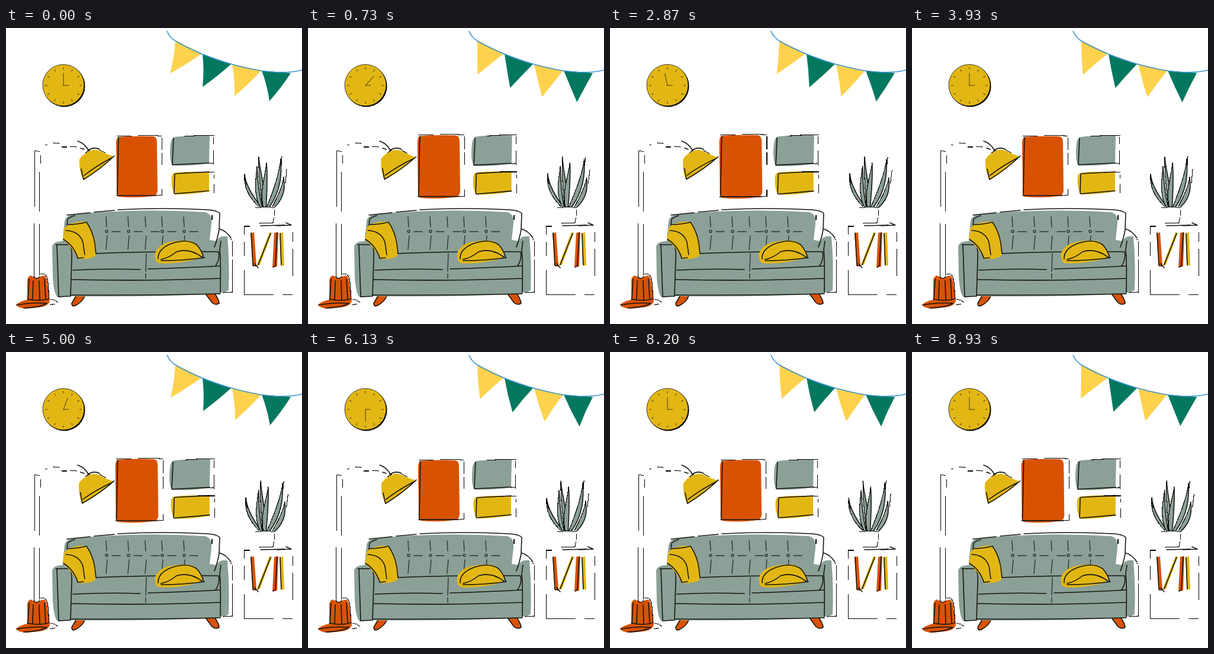
Write an HTML page that moves like this. It is 500 by 500 pixels and loops after 9.01 s.

```html
<!DOCTYPE html>
<html lang="en">
<head>
<meta charset="utf-8">
<title>Living room</title>
<style>
  html, body { margin: 0; width: 100%; height: 100%; overflow: hidden; background: #fff; }
  svg { display: block; width: 100vw; height: 100vh; }
  .ink { fill: none; stroke: #15160f; stroke-width: 1.6; stroke-linecap: round; stroke-linejoin: round; }
  .thin { fill: none; stroke: #000; stroke-width: 1.1; shape-rendering: crispEdges; }
  .soft { fill: none; stroke: #2d3630; stroke-width: 1.4; stroke-linecap: round; }
  .grey { fill: #8ba097; }
  .red { fill: #d95204; }
  .gold { fill: #e2b714; }
  .brass { fill: none; stroke: #80650f; stroke-width: 1.5; }
</style>
</head>
<body>
<svg viewBox="0 0 500 500">
  <g id="flags"></g>
  <path d="M272 5Q276 16 288 23C318 40 350 52 381 61C420 72 465 80 500 71" fill="none" stroke="#3d94d1" stroke-width="1.6"/>

  <g id="clock">
    <circle cx="98.3" cy="98" r="35.3"/>
    <circle class="gold" cx="97" cy="96.6" r="35" stroke="#15160f" stroke-width=".8"/>
    <g id="ticks"></g>
    <path class="brass" d="M96 97H106"/>
    <path class="brass" id="hand" d="M97 98V76"/>
  </g>

  <g id="poster">
    <path class="red" d="M190 184Q220 182 249 183Q255 184 255 193L256 275Q255 284 247 284Q220 288 190 285Q186 283 187 268L186 196Q186 186 190 184Z"/>
    <path class="ink" d="M190 185L188 281M187 283L255 283"/>
    <path class="thin" d="M187 182.5H212M223 181.5H250L263 182.5M263.5 185V206M263.5 211V231M263.5 272V282.5H256"/>
  </g>
  <g id="print">
    <path class="grey" d="M285 184Q312 181 344 182L343 229Q305 234 281 232Q275 222 278 195Q279 186 285 184Z"/>
    <path class="ink" d="M283 186L281 230M281 231L343 228"/>
    <path class="thin" d="M302 183L326 181.5H352M350.5 184V196M350.5 207V231M343 229L351 228"/>
  </g>
  <g id="card">
    <path class="gold" d="M283 245Q312 241 343 244L343 276Q312 282 285 281Q278 270 280 250Z"/>
    <path class="ink" d="M285 247L284 279M285 280L343 275M286 246L343 243"/>
    <path class="thin" d="M324 243.5H352M351.5 248V254M351.5 264V279"/>
  </g>

  <path class="thin" d="M48.5 207V302M47.5 330V422M49 207L57 209M58.5 215V229M56.5 243V310M56.5 331V418M66 198L70 197M80 194L90 195M94 201H103M109 200L119 201"/>
  <path class="ink" d="M121 191Q133 195 139 206M126 203L132 205M138 207Q148 200 158 205"/>
  <g id="shade">
    <path class="gold" d="M138 209Q148 203 157 207Q170 213 182 217Q161 239 131 257Q123 242 124 222Q129 214 138 209Z"/>
    <path class="ink" d="M183 216Q160 238 131 256L127 238M132 249Q152 233 181 218"/>
    <path class="thin" d="M134 211L142 206M158 206L168 211"/>
  </g>
  <path class="red" d="M36 426Q37 419 42 418L47 421Q52 426 58 420L64 418Q69 420 70 431L74 461Q72 470 55 472L35 474Q20 474 17 467Q25 461 36 459Z"/>
  <path class="ink" d="M39 424L37 457M46 427L45 458M56 427L57 459M65 424L67 457M36 458Q55 462 71 458M18 468Q42 463 69 465Q58 472 30 473M47 420Q51 426 57 420"/>
  <path class="thin" d="M58 415L65 416Q70 419 71 430L73 458M75 458L83 460L88 464M74 468L83 466"/>

  <path class="red" d="M118 452L134 450Q130 462 116 470Q109 472 112 464Z"/>
  <path class="red" d="M336 448L351 447Q361 460 360 465Q354 469 348 464Z"/>
  <path class="ink" d="M118 453L111 465Q111 471 117 469Q129 463 133 453M337 449L348 464Q354 469 360 465Q360 460 353 449"/>
  <g id="sofa">
    <path class="grey" d="M97 345L99 326Q101 317 112 315Q220 304 336 311Q349 314 347 331L344 358L356 360Q359 350 374 352Q378 400 376 443Q370 447 362 447L362 449Q230 455 112 453L88 455Q81 452 79 420L78 370Q79 360 96 360Z"/>
    <path class="ink" d="M104 323L102 345M104 323Q108 319 116 317M84 366L106 366Q112 368 111 390L109 452M86 366L89 454L109 453M150 381Q250 377 358 378M113 409Q170 406 227 408M240 407Q305 405 361 402M111 425Q240 428 362 423M110 451Q230 452 362 449M363 360L361 375Q363 390 362 447M359 378Q362 390 354 402"/>
    <path class="soft" d="M237 381L236 411M236 415V423"/>
    <g id="tufts"></g>
  </g>
  <path class="ink" d="M103 316L142 312M149 311L183 308M189 307Q265 303 340 307Q356 308 361 313L360 341Q357 357 352 370M360 339Q373 343 380 355"/>
  <path class="thin" d="M348 316V324M379 357L382 358M382.5 360V386M382.5 391V446L367 447"/>
  <path class="gold" d="M99 346Q94 338 108 331Q125 325 137 328Q148 345 151 363Q154 379 150 386Q136 392 122 390Q111 370 97 358Q95 351 99 346Z"/>
  <path class="ink" d="M105 332Q120 332 136 328Q147 344 150 364L152 381M97 357Q114 367 121 388M101 342Q124 343 130 362L133 383M121 389L131 388"/>
  <path class="gold" d="M252 388Q249 374 268 364Q290 357 314 360Q327 368 332 384Q330 391 300 395Q275 399 257 397Q252 394 252 388Z"/>
  <path class="ink" d="M257 390Q256 373 280 364Q306 355 322 366Q331 376 334 388M262 391Q276 388 288 378Q310 371 331 387M262 393Q300 393 335 388"/>

  <g id="plant"></g>
  <path class="thin" d="M421 304L440 302L454 304M453.5 307V317M452.5 320L451 329L428 330M402.5 336V349M402.5 361V385M402.5 409V450.5H452M467 450.5H484M484.5 345V361M484.5 373V419M402 335H412"/>
  <path class="ink" d="M430 334L470 333M458 334L482 333L473 329"/>
  <path class="red" d="M413 347L419 345L423 401L417 403ZM453 346L460 345L458 403L450 404Z"/>
  <path class="gold" d="M445 345L449 346L429 400L423 402ZM462 347L468 345L470 401L464 402Z"/>
  <path class="ink" d="M414 346L417 401L422 402M447 347L426 400M420 398L426 405M458 346L455 402L451 404M463 347L465 400"/>
</svg>
<script>
const LOOP = 9010;
const $ = id => document.getElementById(id);

function add(parent, tag, attrs) {
  const el = document.createElementNS('http://www.w3.org/2000/svg', tag);
  for (const key in attrs) el.setAttribute(key, attrs[key]);
  return $(parent).appendChild(el);
}

for (let i = 0; i < 12; i++) {
  add('ticks', 'path', { class: 'brass', d: 'M97 66V70', transform: `rotate(${i * 30} 97 97)` });
}

for (const x of [170, 207, 236, 264, 301]) {
  const button = x !== 236;
  add('tufts', 'path', { class: 'soft', d: `M${x - 1} 319L${x} 336M${x + 1} 351L${x - 1} 374` });
  if (button) add('tufts', 'circle', { class: 'soft', cx: x, cy: 343.5, r: 2 });
  add('tufts', 'path', { class: 'soft', d: `M${x + 9} 344H${x + 23}` });
}

// base x, tip x, tip y, half width, sideways bow
const leaves = [
  [429, 403, 247, 3, -5], [431, 424, 234, 3, -6], [435, 427, 218, 3, 4],
  [437, 440, 228, 4, -4], [443, 464, 221, 4, 5], [452, 469, 252, 4, 5]
];
for (const [base, tip, top, width, bow] of leaves) {
  const mid = (base + tip) / 2 + bow, height = 302 - top;
  const edge = s => [
    `${base + s * width * .6} 302`,
    `${mid + s * width * 1.6} ${302 - height * .35}`,
    `${tip + s * width * .5} ${top + height * .3}`
  ];
  const left = edge(-1), right = edge(1);
  add('plant', 'path', {
    class: 'grey', d: `M${left[0]}C${left[1]} ${left[2]} ${tip} ${top}C${right[2]} ${right[1]} ${right[0]}Z`
  });
  add('plant', 'path', { class: 'ink', d: `M${right[0]}C${right[1]} ${right[2]} ${tip} ${top}` });
  add('plant', 'path', { class: 'thin', d: `M${left[0]}C${left[1]} ${left[2]} ${tip} ${top}` });
}
add('plant', 'path', { class: 'thin', d: 'M466 217L465 232M474 239L472 262M403 253L406 265' });

// left corner, right corner, tip at the left end of the swing
const flags = [
  [286, 21, 331, 43, 277, 77], [332, 44, 380, 61, 332, 99.5],
  [382, 61, 431, 72, 386, 115], [432, 72, 481, 76, 445, 123.5]
].map((points, i) => ({ points, el: add('flags', 'path', { fill: i % 2 ? '#04785f' : '#ffd24d' }) }));

const wave = (t, period) => (1 - Math.cos(2 * Math.PI * t / period)) / 2;
const turn = (id, deg, x, y) => $(id).setAttribute('transform', `rotate(${deg} ${x} ${y})`);
const grow = (id, k, x, y) =>
  $(id).setAttribute('transform', `translate(${x} ${y}) scale(${k}) translate(${-x} ${-y})`);

function draw(t) {
  const swing = wave(t, 2400);
  for (const { points: [ax, ay, bx, by, x, y], el } of flags) {
    const tx = x + 14 * swing, ty = y + 2.5 * swing, bow = 3 - 5 * swing;
    el.setAttribute('d', `M${ax} ${ay}L${bx} ${by}` +
      `Q${(bx + tx) / 2 + bow} ${(by + ty) / 2} ${tx} ${ty}` +
      `Q${(ax + tx) / 2 + bow} ${(ay + ty) / 2} ${ax} ${ay}Z`);
  }

  const spin = Math.min(1, t % (LOOP / 2) / 3260);
  turn('hand', 360 * wave(spin, 2), 97, 97);

  const sway = wave(t, 2000);
  turn('shade', 2.5 * sway, 142, 207);
  turn('plant', 2.2 * sway, 438, 303);
  grow('poster', 1 + 0.04 * sway, 223, 234);
  grow('print', 1 + 0.03 * sway, 312, 207);
  grow('card', 1 + 0.03 * sway, 314, 262);
}

const start = performance.now();
function frame() {
  draw((performance.now() - start) % LOOP);
  requestAnimationFrame(frame);
}
frame();
</script>
</body>
</html>
```
